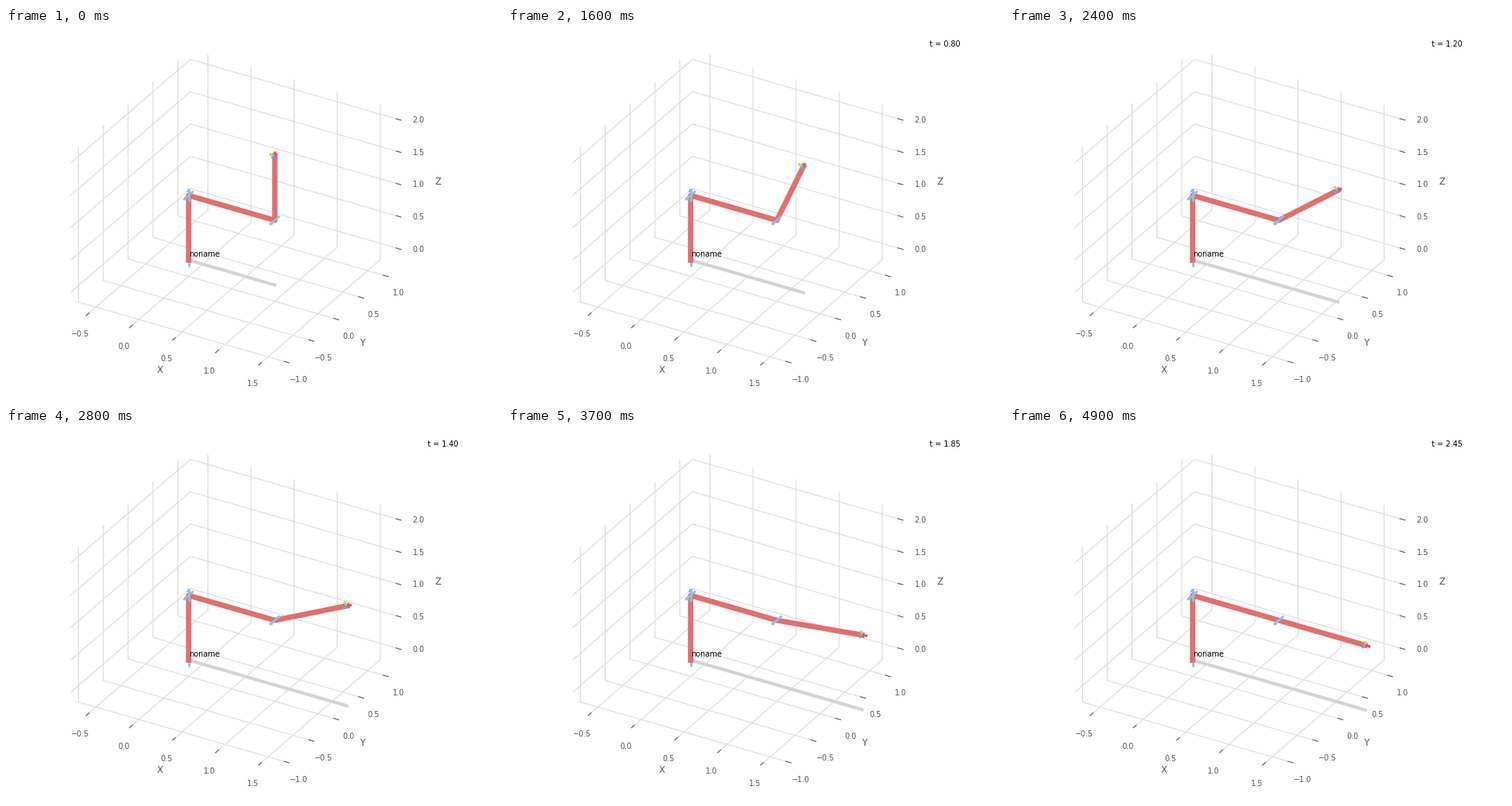
Recreate the animation shown at these times as a matplotlib script. Size 640 px wide and 480 px high, loop 5000 ms.

```python
import numpy as np
import matplotlib.pyplot as plt
from matplotlib.animation import FuncAnimation

FRAMES = 50
INTERVAL = 100
DT = 0.05

LINK, SHADOW, JOINT = "#E16F6D", "lightgrey", "#8FC1E2"
EE_COLORS = ("#F84752", "#BADA55", "#54AEFF")
JOINT_HALF, EE_LENGTH = 0.1, 0.06

plt.style.use("ggplot")
plt.rcParams.update({
    "font.family": "DejaVu Sans",
    "font.size": 7,
    "lines.linewidth": 0.5,
    "xtick.major.size": 1.5,
    "ytick.major.size": 1.5,
    "axes.labelpad": 1,
    "grid.linestyle": "-",
    "grid.color": "#dbdbdb",
})

fig = plt.figure(figsize=(6.4, 4.8), dpi=100)
fig.subplots_adjust(left=-0.09, bottom=0, top=1, right=0.99)
ax = fig.add_subplot(111, projection="3d", proj_type="ortho")
ax.set_facecolor("white")
ax.set(xlabel="X", ylabel="Y", zlabel="Z")
for axis in (ax.xaxis, ax.yaxis, ax.zaxis):
    axis.set_pane_color((1, 1, 1, 1))

shadow, = ax.plot([], [], [], linewidth=3, color=SHADOW)
links, = ax.plot([], [], [], linewidth=5, color=LINK)
ax.text(0, 0, 0.05, "noname")
clock = fig.text(0.85, 0.95, "")
arrows = []

X, Y, Z = np.eye(3)
BASE, SHOULDER, ELBOW = 0 * Z, Z, X + Z
JOINT_AXES = ((BASE, Z), (SHOULDER, Z), (SHOULDER, -Y), (ELBOW, -Y))


def elbow_angle(tau):
    """Quintic rest-to-rest move from a raised to a stretched forearm."""
    return np.pi / 2 * (1 - (10 * tau**3 - 15 * tau**4 + 6 * tau**5))


def add_arrow(start, vector, color):
    arrows.append(ax.quiver(*start, *vector, linewidth=2, color=color))


def fix_limits():
    half = 1.155 * 25 / 24
    for set_lim, mid in ((ax.set_xlim, 0.5), (ax.set_ylim, 0.05), (ax.set_zlim, 0.95)):
        set_lim(mid - half, mid + half)


def update(frame):
    q = elbow_angle(frame / (FRAMES - 1))
    forearm = np.cos(q) * X + np.sin(q) * Z
    normal = -np.sin(q) * X + np.cos(q) * Z
    tip = ELBOW + forearm

    x, y, z = np.array([BASE, SHOULDER, ELBOW, tip]).T
    links.set_data_3d(x, y, z)
    shadow.set_data_3d(x, y, 0 * z)

    while arrows:
        arrows.pop().remove()
    for vector, color in zip((forearm, normal, -Y), EE_COLORS):
        add_arrow(tip, EE_LENGTH * vector, color)
    for center, direction in JOINT_AXES:
        add_arrow(center - JOINT_HALF * direction, 2 * JOINT_HALF * direction, JOINT)

    clock.set_text(f"t = {frame * DT:.2f}" if frame else "")
    fix_limits()
    return [links, shadow, clock, *arrows]


anim = FuncAnimation(fig, update, frames=FRAMES, interval=INTERVAL,
                     init_func=lambda: update(0), repeat=True, repeat_delay=0)
plt.show()
```
